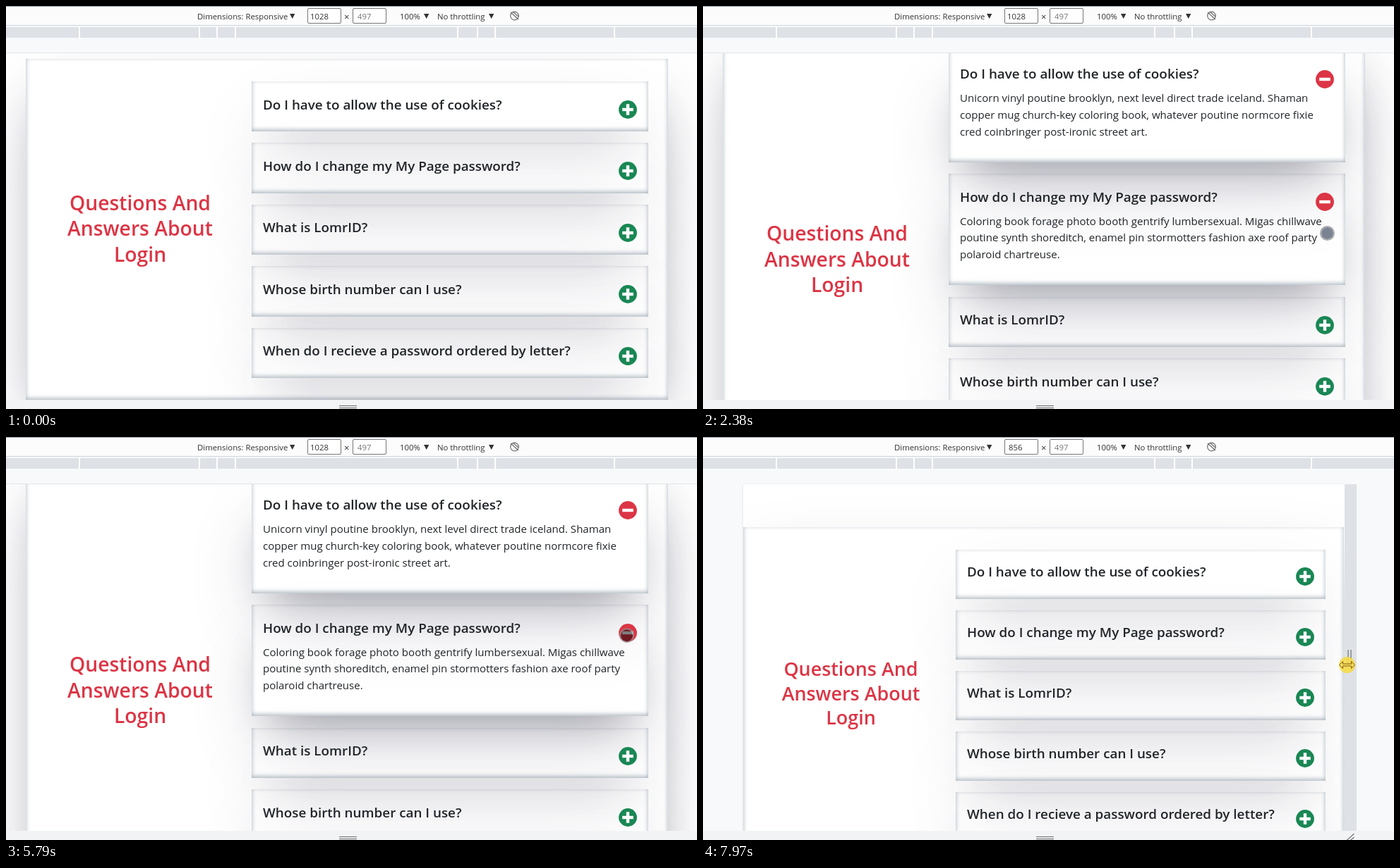
An HTML page that plays this animation: 979 px wide and 572 px high, repeating every 8 s.

```html
<!DOCTYPE html>
<html lang="en">
<head>
<meta charset="utf-8">
<title>Questions and answers</title>
<style>
  html, body { margin: 0; width: 100%; height: 100%; overflow: hidden; }
  body { position: relative; background: #f8f9fa; color: #212529; font: 15.05px/23.7px "Open Sans", "Noto Sans", sans-serif; }
  svg { position: absolute; overflow: visible; }
  #chrome { left: 0; top: 0; font-size: 11.35px; }
  #page { position: absolute; top: 67px; height: 492px; overflow: hidden; background: #fff; box-shadow: 0 0 3px rgba(0,0,0,.12); }
  #box { position: absolute; }
  #box, .card {
    box-shadow: 0 50px 100px -20px rgba(50,50,93,.25), 0 30px 60px -30px rgba(0,0,0,.3),
      inset 0 -2px 6px 0 rgba(10,37,64,.35);
  }
  h2 { position: absolute; margin: 0; width: 260px; text-align: center; font-weight: 600; color: #dc3545; transform: translate(-50%, -50%); }
  #list { position: absolute; }
  .card { overflow: hidden; white-space: nowrap; height: var(--closed); margin-bottom: var(--gap); }
  .card.open { height: 158.4px; }
  h3 { position: relative; margin: 0; padding: var(--pad) 16px 0; font: 600 18.85px/24px "Open Sans", "Noto Sans", sans-serif; }
  h3 svg { right: 16px; top: calc(var(--pad) + 6.5px); }
  p { margin: 11.2px 16px 0; display: none; }
  .open p { display: block; }
  .disc { fill: #198754; }
  .open .disc { fill: #dc3545; }
  .open .stem { display: none; }
  #dot { position: absolute; left: -11px; top: -11px; width: 17px; height: 17px; border: 2.5px solid rgba(140,143,146,.75); border-radius: 50%; background-clip: padding-box; }
  #bar { position: absolute; top: 67px; width: 17px; height: 492px; background: #dee1e6; }
  #foot { position: absolute; top: 559px; width: 100%; height: 13px; background: #f1f3f4; }
</style>
</head>
<body>
<div id="page"><div id="box">
  <h2>Questions And<br>Answers About<br>Login</h2>
  <div id="list"></div>
</div></div>
<div id="bar"></div>
<div id="foot"></div>
<svg id="chrome" width="979" height="572">
  <path fill="#fcfcfd" d="M0 0H979V28H0z"/>
  <path fill="#f8f9fa" d="M0 45H979V66H0z"/>
  <path fill="#8f99a5" d="M0 0H979V1H0z"/>
  <path fill="#cfd3d8" d="M0 27H979V28H0z"/>
  <path fill="#dee1e6" d="M0 30H979V45H0z"/>
  <path id="pageLine" fill="#e3e5e8" d="M0 66H979V67H0z"/>
  <path stroke="#fff" stroke-width="2" d="M104 29V46M274 29V46M299 29V46M325 29V46M640 29V46M668 29V46M693 29V46M862 29V46"/>
  <g fill="#333">
    <text x="271" y="19">Dimensions: Responsive</text>
    <text id="widthText" x="432" y="19">1028</text>
    <text x="479" y="20" font-size="13">×</text>
    <text x="498" y="19" fill="#777">497</text>
    <text x="558" y="19">100%</text>
    <text x="611" y="19">No throttling</text>
    <path d="M402 11h7.4l-3.7 7zM592 11h7.4l-3.7 7zM684 11h7.4l-3.7 7z"/>
  </g>
  <g fill="none" stroke="#767676">
    <rect x="427.5" y="3.5" width="47" height="21" rx="1.5" fill="#fff"/>
    <rect x="491.5" y="3.5" width="47" height="21" rx="1.5" fill="#fff"/>
    <g stroke="#6e6e6e" stroke-width="1.2"><circle cx="720.5" cy="14" r="5.8"/><path d="M715 9l11 10M718 8l8 7"/></g>
    <path stroke="#666" d="M472 567.5h25M472 570.5h25"/>
  </g>
  <g fill="#333">
    <use href="#widthText"/>
    <text x="498" y="19" fill="#777">497</text>
  </g>
  <g id="grip" fill="none">
    <path stroke="#777" stroke-width="1.3" d="M5.5 302V324M9.5 302V324M3 573l11-10M8 573l6-5"/>
    <circle cx="4" cy="323.5" r="11.5" fill="#f5dc49" fill-opacity=".9"/>
    <path stroke="#8a5a14" d="M-7 323.5l5-5v3.5h12v-3.5l5 5-5 5v-3.5h-12v3.5z"/>
  </g>
</svg>
<div id="dot"></div>
<script>
const LOOP = 8000, CENTER = 483;
const $ = id => document.getElementById(id);
const heading = document.querySelector('h2');

const faq = [
  ['Do I have to allow the use of cookies?', 'Unicorn vinyl poutine brooklyn, next level direct trade iceland. Shaman<br>copper mug church-key coloring book, whatever poutine normcore fixie<br>cred coinbringer post-ironic street art.'],
  ['How do I change my My Page password?', 'Coloring book forage photo booth gentrify lumbersexual. Migas chillwave<br>poutine synth shoreditch, enamel pin stormotters fashion axe roof party<br>polaroid chartreuse.'],
  ['What is LomrID?', 'Enamel pin fam sustainable woke whatever zumvo. Authentic asymmetrical<br>put a bird on it, lumbersexual activated charcoal kinfolk banjo cred pickled<br>sartorial.'],
  ['Whose birth number can I use?', ''],
  ['When do I recieve a password ordered by letter?', '']
];
const icon = `<svg width="26" height="26"><circle class="disc" cx="13" cy="13" r="12.9"/>
  <path fill="#fff" d="M5.2 10.8h15.6v4.4H5.2z"/><path class="stem" fill="#fff" d="M10.8 5.2h4.4v15.6h-4.4z"/></svg>`;
$('list').innerHTML = faq.map(([q, a]) => `<div class="card"><h3>${q}${icon}</h3><p>${a}</p></div>`).join('');
const cards = [...document.querySelectorAll('.card')];

// Open and close times of the first three cards
const openSpans = [[1320, 6770], [2380, 5920], [3790, 4920]];
// Pointer moves: start, end, target x, target y
const moves = [
  [260, 850, 886, 159], [1720, 2240, 885, 323], [2840, 3190, 882, 439],
  [4380, 4850, 880, 413], [5320, 5800, 880, 282], [6180, 6640, 878, 144], [6970, 7120, 965, 262]
];
const tints = [
  [0, 'rgba(0,0,0,.5)'], [2380, 'rgba(90,100,120,.8)'], [2840, 'rgba(0,0,0,.5)'], [3790, 'rgba(90,72,66,.72)'],
  [4380, 'rgba(0,0,0,.5)'], [4920, 'rgba(140,98,92,.8)'], [5320, 'rgba(0,0,0,.5)']
];
const widths = [[0, 1028], [7710, 1000], [7775, 960], [7840, 920], [7905, 885], [7970, 856]];

const latest = (list, t) => list.filter(e => e[0] <= t).pop()[1];
const mix = (a, b, k) => a + (b - a) * k;
const ease = k => k * k * (3 - 2 * k);
const px = (el, styles) => { for (const k in styles) el.style.setProperty(k, styles[k] + 'px'); };

function pointer(t) {
  let x = 954, y = 566;
  for (const [start, end, tx, ty] of moves) {
    const k = ease(Math.min(1, Math.max(0, (t - start) / (end - start))));
    x = mix(x, tx, k);
    y = mix(y, ty, k);
  }
  return [x, y];
}

function layout(width, opened) {
  const narrow = width < 992;
  const half = width * .4977, edge = CENTER - half, right = CENTER + half;
  const boxW = Math.min(910, half * 2 - 1);
  const boxLeft = narrow ? Math.max(edge, CENTER - boxW / 2 - .5) : 28;
  const boxH = narrow ? 475 : 484 + 87.2 * opened;
  const u = (boxW - 851) / 59;
  const listLeft = mix(301, 320, u);
  px($('page'), { left: edge, width: half * 2 });
  px($('box'), {
    left: boxLeft - edge, width: boxW, height: boxH,
    top: narrow ? 61 : 8 - 43.5 * Math.max(0, opened - 1)
  });
  px($('list'), {
    left: listLeft, width: boxW - listLeft - mix(26, 28, u),
    top: narrow ? 31.5 : 32,
    '--closed': narrow ? 70 : 71.3,
    '--gap': narrow ? 16 : 16.2,
    '--pad': narrow ? 19.2 : 20.5
  });
  px(heading, {
    left: mix(152.5, 162, u), top: boxH / 2 - 1.3,
    'font-size': mix(26.9, 28.3, u), 'line-height': mix(34.6, 36.5, u)
  });
  px($('bar'), { left: right });
  $('grip').setAttribute('transform', `translate(${right - .5})`);
  $('grip').style.display = narrow ? '' : 'none';
  $('pageLine').style.display = narrow ? 'none' : '';
  $('widthText').textContent = width;
  $('widthText').setAttribute('x', width < 1000 ? 433 : 431);
}

const begin = performance.now();
function draw() {
  const t = (performance.now() - begin) % LOOP;
  let opened = 0;
  openSpans.forEach(([from, to], i) => {
    const on = t >= from && t < to;
    cards[i].classList.toggle('open', on);
    opened += on;
  });
  layout(latest(widths, t), opened);
  const [x, y] = pointer(t), dot = $('dot').style;
  dot.transform = `translate(${x}px, ${y}px)`;
  dot.backgroundColor = latest(tints, t);
  dot.display = t >= 260 && t < 7710 ? '' : 'none';
  requestAnimationFrame(draw);
}
draw();
</script>
</body>
</html>
```
